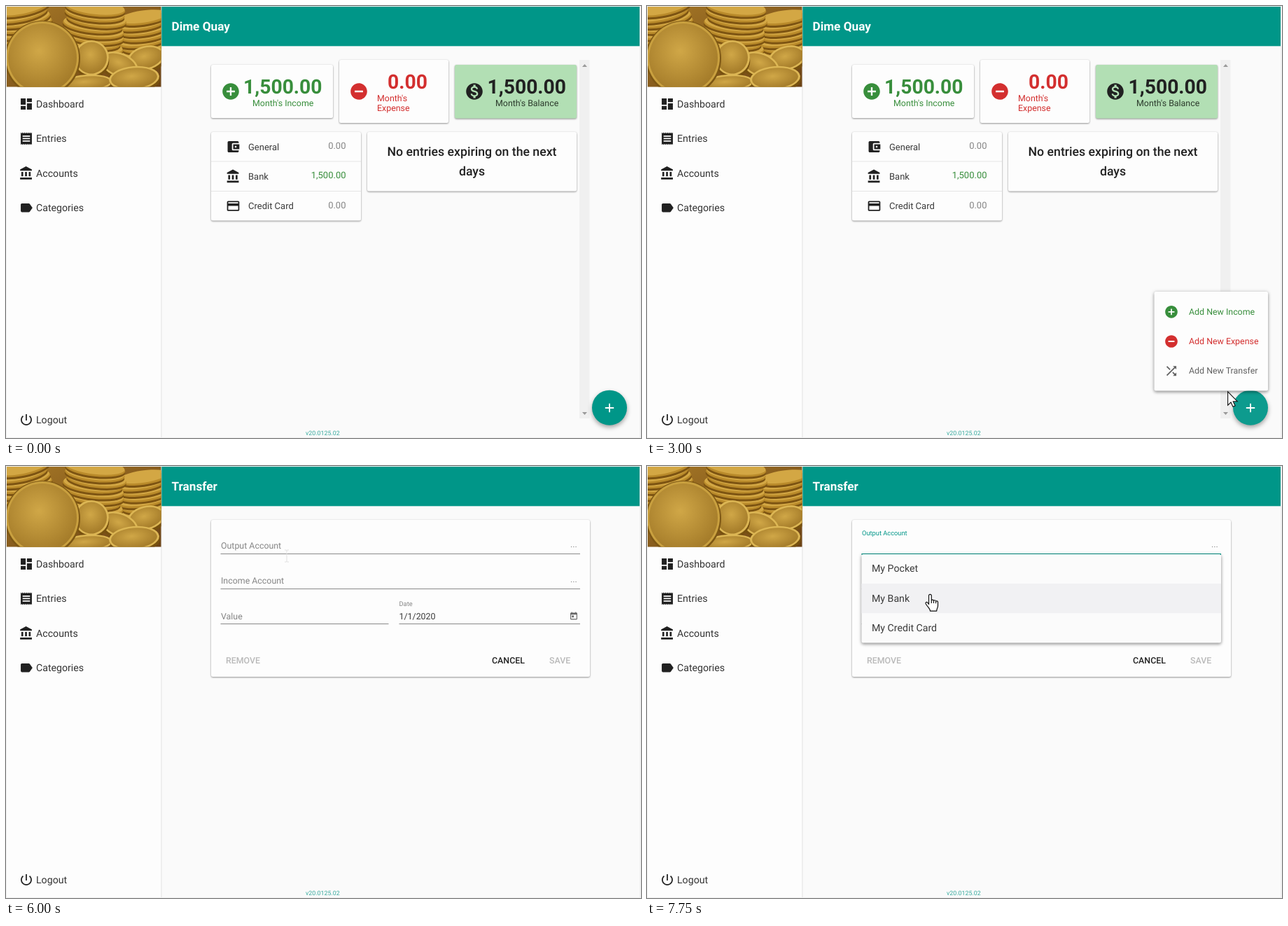
An HTML page for the animation above (8000 ms loop, 907 by 617 pixels).

```html
<!DOCTYPE html>
<html lang="en">
<head>
<meta charset="utf-8">
<title>Budget app</title>
<style>
  html, body { margin: 0; width: 100%; height: 100%; overflow: hidden; background: #fafafa; }
  svg { display: block; width: 100%; height: 100%; }
  text { font-family: Roboto, sans-serif; text-rendering: geometricPrecision; white-space: pre; }
  .card { filter: drop-shadow(0 1px .8px rgba(0,0,0,.38)) drop-shadow(0 0 1px rgba(0,0,0,.08)); }
  .pop { filter: drop-shadow(0 2px 2px rgba(0,0,0,.34)) drop-shadow(0 0 2.5px rgba(0,0,0,.16)); }
  .fab { filter: drop-shadow(0 3px 3px rgba(0,0,0,.36)); }
</style>
</head>
<body>
<svg id="stage" viewBox="0 0 907 617" preserveAspectRatio="none"></svg>
<script>
const LOOP = 8000, STEP = 250;
const TEAL = '#009688', GREEN = '#388e3c', RED = '#d32f2f', INK = '#212121', SOFT = '#3a3a3a', GREY = '#858585';
const MEDIUM = 'font-weight="500"', BOLD = 'font-weight="700"', END = 'text-anchor="end"', MID = 'text-anchor="middle"';

const disc = 'M12 2C6.48 2 2 6.48 2 12s4.48 10 10 10 10-4.48 10-10S17.52 2 12 2z';
const icons = {
  dashboard: 'M3 13h8V3H3v10zm0 8h8v-6H3v6zm10 0h8V11h-8v10zm0-18v6h8V3h-8z',
  receipt: 'M18 17H6v-2h12v2zm0-4H6v-2h12v2zm0-4H6V7h12v2zM3 22l1.5-1.5L6 22l1.5-1.5L9 22l1.5-1.5L12 22l1.5-1.5L15 22l1.5-1.5L18 22l1.5-1.5L21 22V2l-1.5 1.5L18 2l-1.5 1.5L15 2l-1.5 1.5L12 2l-1.5 1.5L9 2 7.5 3.5 6 2 4.5 3.5 3 2v20z',
  bank: 'M4 10v7h3v-7H4zm6 0v7h3v-7h-3zM2 22h19v-3H2v3zm14-12v7h3v-7h-3zm-4.5-9L2 6v2h19V6l-9.5-5z',
  label: 'M17.63 5.84C17.27 5.33 16.67 5 16 5H5C3.9 5 3 5.9 3 7v10c0 1.1.9 2 2 2h11c.67 0 1.27-.33 1.63-.84L22 12z',
  power: 'M13 3h-2v10h2V3zm4.83 2.17l-1.42 1.42C17.99 7.86 19 9.81 19 12c0 3.87-3.13 7-7 7s-7-3.13-7-7c0-2.19 1.01-4.14 2.58-5.42L6.17 5.17C4.23 6.82 3 9.26 3 12c0 4.97 4.03 9 9 9s9-4.03 9-9c0-2.74-1.23-5.18-3.17-6.83z',
  wallet: 'M21 18v1c0 1.1-.9 2-2 2H5c-1.11 0-2-.9-2-2V5c0-1.1.89-2 2-2h14c1.1 0 2 .9 2 2v1h-9c-1.11 0-2 .9-2 2v8c0 1.1.89 2 2 2h9zm-9-2h10V8H12v8zm4-2.5c-.83 0-1.5-.67-1.5-1.5s.67-1.5 1.5-1.5 1.5.67 1.5 1.5-.67 1.5-1.5 1.5z',
  credit: 'M20 4H4c-1.1 0-2 .9-2 2v12c0 1.1.9 2 2 2h16c1.1 0 2-.9 2-2V6c0-1.1-.9-2-2-2zm0 14H4v-6h16v6zm0-10H4V6h16v2z',
  plus: disc + 'M17 13h-4v4h-2v-4H7v-2h4V7h2v4h4v2z',
  minus: disc + 'M17 13H7v-2h10v2z',
  dollar: disc + 'M13.41 18.09V20h-2.67v-1.93c-1.71-.36-3.16-1.46-3.27-3.4h1.96c.1 1.05.82 1.87 2.65 1.87 1.96 0 2.4-.98 2.4-1.59 0-.83-.44-1.61-2.67-2.14-2.48-.6-4.18-1.62-4.18-3.67 0-1.72 1.39-2.84 3.11-3.21V4h2.67v1.95c1.86.45 2.79 1.86 2.85 3.39H14.3c-.05-1.11-.64-1.87-2.22-1.87-1.5 0-2.4.68-2.4 1.64 0 .84.65 1.39 2.67 1.91s4.18 1.39 4.18 3.91c-.01 1.83-1.38 2.83-3.12 3.16z',
  shuffle: 'M10.59 9.17L5.41 4 4 5.41l5.17 5.17 1.42-1.41zM14.5 4l2.04 2.04L4 18.59 5.41 20 17.96 7.46 20 9.5V4h-5.5zm.33 9.41l-1.41 1.41 3.13 3.13L14.5 20H20v-5.5l-2.04 2.04-3.13-3.13z',
  today: 'M19 3h-1V1h-2v2H8V1H6v2H5c-1.1 0-2 .9-2 2v14c0 1.1.9 2 2 2h14c1.1 0 2-.9 2-2V5c0-1.1-.9-2-2-2zm0 16H5V8h14v11zM7 10h5v5H7z'
};

const rect = (x, y, w, h, fill, extra = '') =>
  `<rect x="${x}" y="${y}" width="${w}" height="${h}" fill="${fill}" ${extra}/>`;
const card = (x, y, w, h, fill = '#fdfdfd', kind = 'card') =>
  rect(x, y, w, h, fill, `rx="2.5" class="${kind}"`);
const text = (x, y, str, size = 12.4, fill = INK, extra = '') =>
  `<text x="${x}" y="${y}" font-size="${size}" fill="${fill}" ${extra}>${str}</text>`;
const icon = (name, cx, cy, size = 21.2, fill = INK) =>
  `<path d="${icons[name]}" fill="${fill}" fill-rule="evenodd" transform="translate(${cx - size / 2} ${cy - size / 2}) scale(${size / 24})"/>`;
const oval = (cx, cy, rx, ry, fill, extra = '') =>
  `<ellipse cx="${cx}" cy="${cy}" rx="${rx}" ry="${ry}" fill="${fill}" ${extra}/>`;
const group = (id, body) => `<g id="${id}">${body}</g>`;

function pile(cx, top, bottom, rx, tilt) {
  let out = '';
  for (let y = bottom, i = 0; y >= top; y -= 8, i++) {
    const x = cx + 2.5 * Math.sin(i * 2.3), ry = rx * .27;
    out += oval(x, y + 4, rx, ry, '#7d5412') + oval(x, y + 1, rx, ry, '#b98a2a') + oval(x, y - 1, rx - 1, ry - 1, '#d3a744');
  }
  return `<g transform="rotate(${tilt} ${cx} ${bottom})">${out}</g>`;
}

function coin(cx, cy, rx, ry, tilt) {
  return `<g transform="rotate(${tilt} ${cx} ${cy})">` + oval(cx + 1, cy + 4, rx, ry, '#76500f') +
    oval(cx, cy, rx, ry, '#dcb654') + oval(cx, cy, rx - 3, ry - 2.5, 'url(#gold)') + '</g>';
}

function photo() {
  return '<g clip-path="url(#photo)">' + rect(0, 0, 222, 116, 'url(#shade)') +
    pile(200, 10, 64, 36, -8) + pile(32, 2, 50, 38, -12) + pile(122, 2, 66, 43, 6) +
    coin(200, 74, 27, 17, -14) + coin(162, 84, 28, 17, 22) + coin(122, 74, 25, 25, 10) +
    coin(115, 110, 37, 12, -4) + coin(183, 103, 36, 17, -5) +
    oval(52, 75, 54, 54, '#7d5714') + oval(52, 74, 52, 52, '#c9a03f') + oval(52, 74, 49, 49, 'url(#gold)') + '</g>';
}

function sidebar() {
  const items = [['dashboard', 'Dashboard', 140], ['receipt', 'Entries', 189.4], ['bank', 'Accounts', 238.8],
    ['label', 'Categories', 288.2], ['power', 'Logout', 591]];
  return rect(1, 1, 220.5, 615, '#fdfdfd') + rect(221.5, 57, 1, 559, '#e2e2e2') + photo() +
    items.map(([pic, name, y]) => icon(pic, 29, y) + text(43, y + 5, name, 14.16, '#333')).join('');
}

function dashboard() {
  const rows = [['wallet', 'General', '0.00', GREY], ['bank', 'Bank', '1,500.00', GREEN], ['credit', 'Credit Card', '0.00', GREY]];
  const notice = MEDIUM + ' ' + MID;
  return card(293, 84, 174, 76) + icon('plus', 321, 122, 28.3, GREEN) +
    text(339, 125, '1,500.00', 28.3, GREEN, BOLD) + text(352, 143, "Month's Income", 12.4, GREEN) +
    card(476, 77, 156, 90) + icon('minus', 504, 122, 28.3, RED) +
    text(545, 118, '0.00', 28.3, RED, BOLD) + text(530, 136, "Month's", 12.4, RED) + text(530, 150, 'Expense', 12.4, RED) +
    card(641, 84, 174, 76.5, '#b2dfb4') + icon('dollar', 669, 122, 28.3) +
    text(687.5, 125, '1,500.00', 28.3, INK, BOLD) + text(699, 143, "Month's Balance", 12.4, '#2b3a2c') +
    card(293, 180, 214, 126.5) + rect(293, 221.5, 214, 1, '#e6e6e6') + rect(293, 264, 214, 1, '#e6e6e6') +
    rows.map(([pic, name, sum, tint], i) => {
      const y = 201 + i * 42.3;
      return icon(pic, 324.5, y) + text(346, y + 4.6, name, 13, SOFT) + text(485.5, y + 3, sum, 13, tint, END);
    }).join('') +
    card(516, 180, 299, 84.5) + text(665.5, 214, 'No entries expiring on the next', 17.7, INK, notice) +
    text(665.5, 242, 'days', 17.7, INK, notice) +
    rect(819, 77, 14.5, 512, '#f0f0f0') + '<path d="M823 87h7l-3.5-4zM823 580h7l-3.5 4z" fill="#9a9a9a"/>' +
    '<g class="fab"><circle cx="862" cy="573.7" r="25" fill="#009688"/></g>' +
    '<circle id="ripple" cx="862" cy="573.7" r="25" fill="#fff"/>' +
    '<path d="M855.8 574h12.4M862 567.8v12.4" stroke="#fff" stroke-width="1.8"/>';
}

function menu() {
  const rows = [['plus', 'Income', GREEN], ['minus', 'Expense', RED], ['shuffle', 'Transfer', '#616161']];
  return card(724.5, 408, 162.5, 141.5, '#fdfdfd', 'pop') + rect(724.5, 0, 162.5, 42.4, '#f3f3f3', 'id="menuHover"') +
    rows.map(([pic, name, tint], i) => {
      const y = 436.8 + i * 42.2;
      return icon(pic, 749, y, 21.2, tint) + text(774, y + 4, 'Add New ' + name, 12.4, tint);
    }).join('');
}

function form() {
  const line = (x, y, w) => rect(x, y, w, 1, '#8a8a8a');
  return card(293, 77, 541, 224) +
    text(307, 117.8, 'Output Account', 12.4, GREY, 'id="outLabel"') + line(306.5, 125, 513.5) +
    text(307, 168, 'Income Account', 12.4, GREY) + line(306.5, 175, 513.5) +
    text(307, 218.7, 'Value', 12.4, GREY) + line(306.5, 225, 240) +
    text(561.5, 199.7, 'Date', 9.3, GREY) + text(561.5, 218.7, '1/1/2020', 12.4, SOFT) + line(561.5, 225, 258.5) +
    text(806, 115.5, '...', 12.4, GREY) + text(806, 165.5, '...', 12.4, GREY) + icon('today', 811, 214.5, 13.2, '#666') +
    text(314, 282.3, 'REMOVE', 12.4, '#b9b9b9', MEDIUM) + text(694, 282.3, 'CANCEL', 12.4, INK, MEDIUM) +
    text(776, 282.3, 'SAVE', 12.4, '#b9b9b9', MEDIUM) +
    rect(0, 125, 0, 2, TEAL, 'id="focusLine"') + rect(307, 107, 1, 13, TEAL, 'id="caret"');
}

function options() {
  return card(306.5, 126, 513.5, 126.5, '#fbfbfb', 'pop') + rect(306.5, 168, 513.5, 42.3, '#f1f1f3', 'id="optionHover"') +
    ['My Pocket', 'My Bank', 'My Credit Card'].map((s, i) => text(321, 151.3 + i * 42.3, s, 14.16, SOFT)).join('');
}

const cursors = `
  <path id="arrow" d="M.6.8v19.4l4.4-4.2 2.9 6.3 3.2-1.4-2.9-6.2h6z" fill="#fff" stroke="#111" stroke-width="1.1"/>
  <path id="hand" d="M5.5 15V2.8a1.9 1.9 0 0 1 3.8 0V9.5c.4-1.4 3.1-1.2 3.2.5.6-1.2 3-1 3.1.8.7-1 2.9-.6 2.9 1.2v5c0 3-1.8 4-1.8 7.6H7.6C7.4 21.5 4 19 1.3 14.5.2 12.4 2.2 11 3.7 12.7zM9.3 9.5v4M12.5 10v3.5M15.6 10.8v3" fill="#fff" stroke="#111" stroke-width="1.2" stroke-linejoin="round"/>
  <path id="beam" d="M-3 0h2.500l.5.8.5-.8H3M0 .8v15.4M-3 17h2.500l.5-.8.5.8H3" fill="none" stroke="#e0e0e0"/>`;

// start time, pointer shape, x, y
const pointer = [
  [0, '', 0, 0], [500, 'arrow', 829, 316], [750, 'arrow', 829, 322], [1000, 'arrow', 791, 475],
  [1250, 'arrow', 852, 567], [1500, 'hand', 861, 576], [2500, 'arrow', 860, 575.5], [3000, 'arrow', 829, 550],
  [3250, 'hand', 831, 426], [3500, 'hand', 831, 452], [3750, 'hand', 831, 500], [4000, 'hand', 831, 526],
  [4750, 'arrow', 831, 526], [5250, 'arrow', 668, 368], [5500, 'arrow', 509, 168], [6000, 'beam', 401, 120],
  [6250, 'beam', 430, 120], [6500, 'beam', 467.5, 120], [7250, 'hand', 460, 128], [7500, 'hand', 430, 135],
  [7750, 'hand', 397, 182.5]
];

const stage = document.getElementById('stage');
stage.innerHTML = `<defs>
  <clipPath id="photo"><rect x="1" y="1" width="220.5" height="114.5"/></clipPath>
  <radialGradient id="gold" cx=".45" cy=".4" r=".75"><stop stop-color="#d0a747"/><stop offset="1" stop-color="#9a7122"/></radialGradient>
  <linearGradient id="shade" x2="1" y2="1"><stop stop-color="#a67826"/><stop offset="1" stop-color="#6b4215"/></linearGradient>
  </defs>` +
  rect(0, 0, 907, 617, '#f0f0f0') + rect(1, 1, 904, 615, '#fafafa') + sidebar() +
  rect(222.3, 1, 682.7, 56.3, TEAL) + text(236.5, 35, '', 17.2, '#fff', BOLD + ' id="title"') +
  text(428, 612.5, 'v20.0125.02', 8.85, '#39ab9f') +
  group('dash', dashboard()) + group('menu', menu()) + group('form', form()) + group('options', options()) +
  group('pointers', cursors);

const el = id => document.getElementById(id);
const show = (id, on) => el(id).setAttribute('display', on ? 'inline' : 'none');
const set = (id, attrs) => { for (const k in attrs) el(id).setAttribute(k, attrs[k]); };
const zoom = (x, y, sx, sy) => `translate(${x} ${y}) scale(${sx} ${sy}) translate(${-x} ${-y})`;

function draw(time) {
  const t = Math.floor((time % LOOP) / STEP) * STEP;
  const home = t < 4750, focused = t >= 7000;
  el('title').textContent = home ? 'Dime Quay' : 'Transfer';
  show('dash', home);
  show('form', !home);

  show('menu', home && t >= 2500);
  const opening = t < 2750;
  set('menu', { opacity: opening ? .9 : 1, transform: zoom(887, 549.5, opening ? .99 : 1, opening ? .992 : 1) });
  set('ripple', { opacity: t < 2500 || t >= 3250 ? 0 : t < 3000 ? .1 : .05 });
  const row = t < 3750 ? 0 : t < 4000 ? 1 : 2;
  show('menuHover', t >= 3250);
  set('menuHover', { y: 415 + row * 42.4 });

  set('outLabel', focused ? { y: 99.3, 'font-size': 9.3, fill: TEAL } : { y: 117.8, 'font-size': 12.4, fill: GREY });
  const half = t < 7000 ? 0 : t < 7250 ? 195 : 256.75;
  set('focusLine', { x: 563.25 - half, width: half * 2, fill: t < 7250 ? '#00695c' : TEAL });
  show('caret', focused && t < 7500);
  show('options', t >= 7250);
  set('options', { opacity: t < 7500 ? .88 : 1, transform: zoom(563, 126, 1, t < 7500 ? .97 : 1) });
  show('optionHover', t >= 7750);

  const [, shape, x, y] = pointer.filter(p => p[0] <= t).pop();
  for (const id of ['arrow', 'hand', 'beam']) show(id, id === shape);
  set('pointers', { transform: `translate(${x} ${y})` });
}

const begin = performance.now();
function tick() {
  draw(performance.now() - begin);
  requestAnimationFrame(tick);
}
tick();
</script>
</body>
</html>
```
